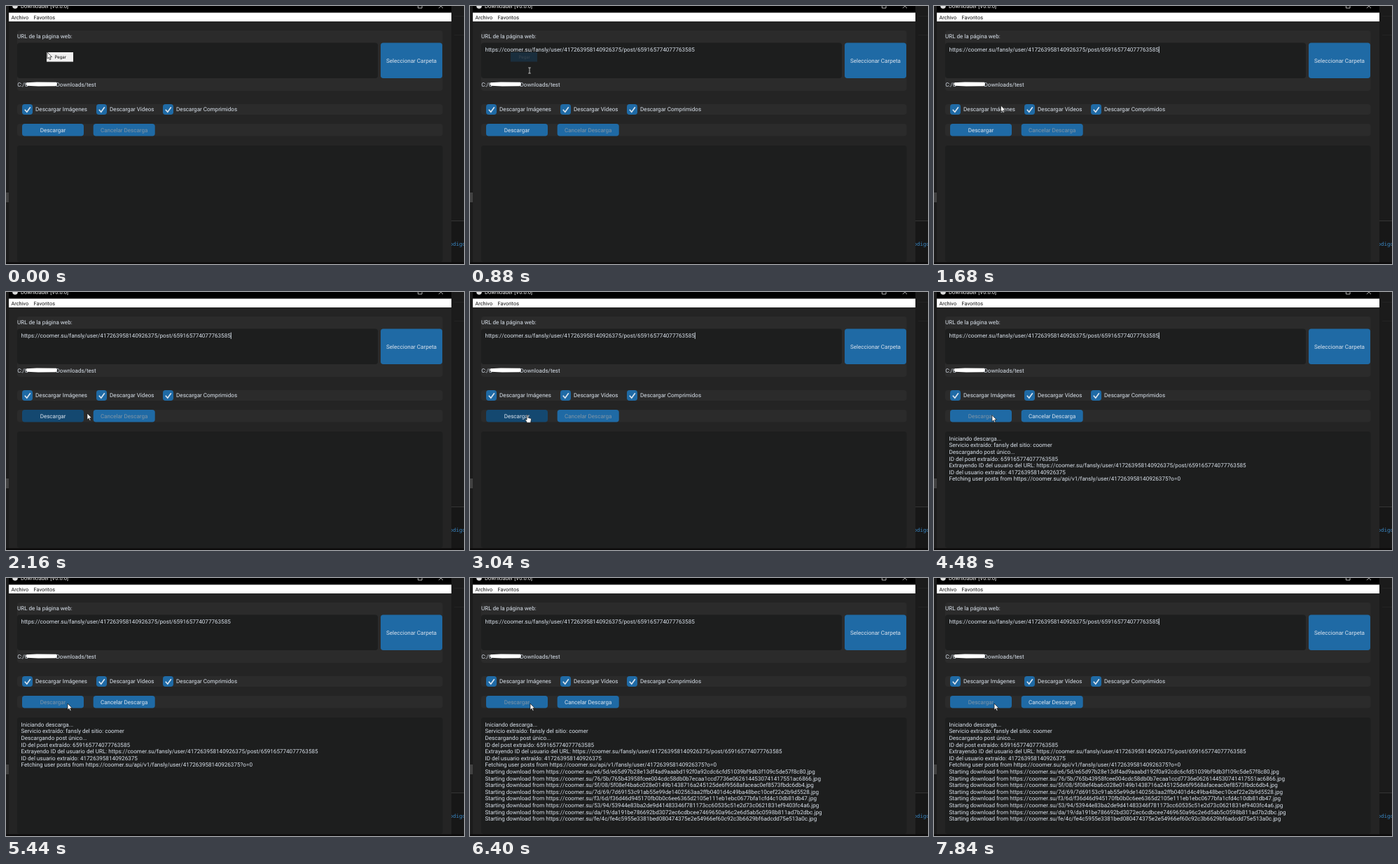
Write an HTML page that moves like this. It is 654x368 px and loops after 8 s.

```html
<!DOCTYPE html>
<html lang="es">
<head>
<meta charset="utf-8">
<style>
  html, body { margin: 0; width: 100%; height: 100%; overflow: hidden; background: #242424; }
  svg { display: block; width: 654px; height: 368px; }
  text { font: 8.05px Roboto, sans-serif; font-kerning: none; text-rendering: geometricPrecision; fill: #dce4ee; white-space: pre; }
  .mid { text-anchor: middle; }
  .long { font-size: 8.1px; }
  .bar { font-size: 7.35px; fill: #111; }
  .title { font-size: 7.6px; fill: #eee; }
  .code { font: 7.5px "Noto Sans Mono", monospace; fill: #3987c4; }
  .menu { font-size: 6.3px; fill: #111; }
  .row { fill: #2b2b2b; }
  .box { fill: #1d1e1e; }
  .btn { fill: #1f6aa5; }
  .line { fill: none; stroke: #ddd; stroke-width: .8; }
  .tick { fill: none; stroke: #dce4ee; stroke-width: 1.7; }
  .ptr { fill: #fff; stroke: #111; stroke-width: .7; stroke-linejoin: round; }
</style>
</head>
<body>
<svg id="stage" viewBox="0 0 654 368" xmlns="http://www.w3.org/2000/svg"></svg>
<script>
const NS = 'http://www.w3.org/2000/svg';
const stage = document.getElementById('stage');
const LOOP = 8000;

function add(tag, attrs, content, parent = stage) {
  const el = document.createElementNS(NS, tag);
  for (const k in attrs) el.setAttribute(k, attrs[k]);
  if (content) el.textContent = content;
  parent.appendChild(el);
  return el;
}
const rect = (x, y, width, height, cls, rx = 0, parent) =>
  add('rect', { x, y, width, height, rx, class: cls }, '', parent);
const fill = (x, y, width, height, color) => add('rect', { x, y, width, height, fill: color });
const text = (x, y, str, cls = '', parent) => add('text', { x, y, class: cls }, str, parent);
const path = (d, cls, parent) => add('path', { d, class: cls }, '', parent);
const show = (el, on) => { el.style.visibility = on ? 'visible' : 'hidden'; };

function button(x, y, w, h, label) {
  return {
    face: rect(x, y, w, h, 'btn', 3.75),
    label: text(x + w / 2, y + h / 2 + 2.9, label, 'mid')
  };
}

// Editor behind the window
fill(0, 0, 654, 368, '#1b1b1b');
fill(0, 266, 4, 14, '#414141');
fill(636, 306, 18, 1, '#343434');
fill(636, 307, 18, 61, '#171717');
fill(640, 14, 14, .6, '#292929');
fill(640, 41, 14, .6, '#292929');
text(633.6, 341.6, 'odigo', 'code');

// Window frame
fill(4, 0, 632, 366, '#242424');
fill(4, 0, 632, 10, '#000');
fill(0, 365.5, 654, 2.5, '#0c0b0b');
add('circle', { cx: 13, cy: 0, r: 3.8, fill: '#ddd' });
text(21, 3, 'Downloader [V0.0.0]', 'title');
path('M588.4 -3V3H594V-3', 'line');
path('M618 3.2L624 -2.8M618 -2.8L624 3.2', 'line');
fill(4, 9.5, 632, 12.5, '#fff');
text(7.4, 18.6, 'Archivo', 'bar');
text(39.5, 18.6, 'Favoritos', 'bar');

// Form
rect(16, 35, 607.5, 86, 'row', 3.75);
text(16, 46.4, 'URL de la página web:');
rect(16, 52.5, 515, 50.5, 'box', 3.75);
button(535, 52.5, 88, 50.5, 'Seleccionar Carpeta');
text(16.2, 114.6, 'C:/U');
text(71.6, 114.6, 'Downloads/test');
path('M29 109.2L44 108.6L72 108.8L72.6 111L71.5 114.2L46 114.4L30 113.8L28.4 111.4Z', 'scrub').setAttribute('fill', '#fff');

rect(16, 140, 607.5, 15, 'row', 3.75);
[[23, 'Imágenes'], [129, 'Vídeos'], [224, 'Comprimidos']].forEach(([x, kind]) => {
  rect(x, 140, 15, 15, 'btn', 3.75);
  path(`M${x + 3.8} 147.8l3 3.4l5 -7`, 'tick');
  text(x + 19.1, 150.2, 'Descargar ' + kind);
});

rect(16, 168, 607.5, 17.5, 'row', 3.75);
const start = button(23, 168, 88, 17.5, 'Descargar');
const cancel = button(124.7, 168, 88, 17.5, 'Cancelar Descarga');
rect(16, 199, 607.5, 166, 'box', 3.75);

// URL and log
const site = 'https://coomer.su/';
const user = '417263958140926375';
const post = '659165774077763585';
const postUrl = `${site}fansly/user/${user}/post/${post}`;
const urlText = text(21.5, 65, postUrl, 'long');
const caret = fill(320.8, 57.6, .9, 9.4, '#dce4ee');

const files = [
  'e65d97b28e13df4ad9aaabd192f0a92cdc6cfd51039bf9db3f109c5de57f8c80',
  '765b43958fcee004cdc58db0b7ecaa1ccd7736e0626144530741417551ac6866',
  '5f08ef4ba6c028e0149b1438716a245125de6f9568afaceac0ef8573fbdc6db4',
  '7d69153c91ab55e99de1402563aa2ffb0401d4c49ba48bec10cef22e2b9d5528',
  'f36d46d945170fb0b0c6ee6365d2105e111eb1ebc0677bfa1cfd4c10db81db47',
  '53944e83ba2de9d41483346f781173cc60535c51e2d73c0621831ef9403fc4a6',
  'da191be786692bd3072ec6cdbcee7469650a96c2e6d5ab5c0598b811ad7b2dbc',
  'fe4c5955e3381bed080474375e2e54966ef60c92c3b6629bf6adcdd75e513a0c'
];
const log = [
  'Iniciando descarga...',
  'Servicio extraído: fansly del sitio: coomer',
  'Descargando post único...',
  'ID del post extraído: ' + post,
  'Extrayendo ID del usuario del URL: ' + postUrl,
  'ID del usuario extraído: ' + user,
  `Fetching user posts from ${site}api/v1/fansly/user/${user}?o=0`,
  ...files.map(f => `Starting download from ${site}${f.slice(0, 2)}/${f.slice(2, 4)}/${f}.jpg`)
].map((line, i) => text(21.5, 211.8 + i * 9.6, line, 'long'));

// Context menu
const menu = add('g', {});
const menuFace = rect(58, 66, 38, 13.5, '', 0, menu);
const menuLabel = text(77.6, 75.2, 'Pegar', 'menu mid', menu);

// Pointers, each drawn with its hot spot at 0,0
const pointers = {
  arrow: path('M0 0V9.2L2.1 7.3L3.6 10.6L5.1 9.9L3.7 6.7H6.5Z', 'ptr'),
  hand: path('M-.9 1Q0 -.5 .9 1V4.4L4.6 5.3Q5.6 5.6 5.4 7L4.6 11.4H-.4L-3 7.4Q-3.2 6.2 -.9 7.2Z', 'ptr'),
  beam: path('M-1.8 -4H1.8M0 -4V4M-1.8 4H1.8', 'line')
};

const CLICK = 4380;
const track = [
  [0, 59, 66], [320, 60, 67], [640, 72, 73], [800, 76, 76], [880, 85, 92],
  [1300, 86, 93], [1800, 97, 150], [2000, 110, 172], [2140, 116, 173],
  [2300, 115, 173], [2640, 84, 172], [2720, 82, 171], [3000, 82, 175],
  [CLICK, 82, 175], [4800, 88, 179], [5500, 88, 179], [6000, 86, 179], [LOOP, 86, 179]
];

function pointerAt(t) {
  const i = track.findIndex(k => k[0] > t);
  const [t0, x0, y0] = track[i - 1], [t1, x1, y1] = track[i];
  const p = (t - t0) / (t1 - t0), e = p * p * (3 - 2 * p);
  return [x0 + (x1 - x0) * e, y0 + (y1 - y0) * e];
}

function pointerKind(x, y, t) {
  if (t < 840) return 'arrow';
  if (y < 103) return 'beam';
  return t < CLICK && x < 111 && y > 168 ? 'hand' : 'arrow';
}

function draw(t) {
  const running = t >= CLICK;
  const hot = t >= 500;
  menu.style.opacity = t < 800 ? 1 : Math.max(0, .45 * (1 - (t - 860) / 160));
  menuFace.style.fill = t >= 800 ? '#17476e' : hot ? '#91c9f7' : '#f0f0f0';
  menuLabel.style.fill = t >= 800 ? '#5f7f98' : '#111';

  show(urlText, t >= 800);
  show(caret, t >= 1200 && (t - 1200) % 900 < 600);

  start.face.style.fill = t >= 1900 && !running ? '#144870' : '#1f6aa5';
  start.label.style.fill = running ? '#8296a6' : '#dce4ee';
  cancel.label.style.fill = running ? '#dce4ee' : '#8296a6';

  const lines = t < CLICK ? 0 : t < 4460 ? 6 : t < 5540 ? 7 : 15;
  log.forEach((el, i) => show(el, i < lines));

  const [x, y] = pointerAt(t);
  const kind = pointerKind(x, y, t);
  for (const k in pointers) show(pointers[k], k === kind);
  pointers[kind].setAttribute('transform', `translate(${x} ${y})`);
}

function tick() {
  draw(performance.now() % LOOP);
  requestAnimationFrame(tick);
}
tick();
</script>
</body>
</html>
```
